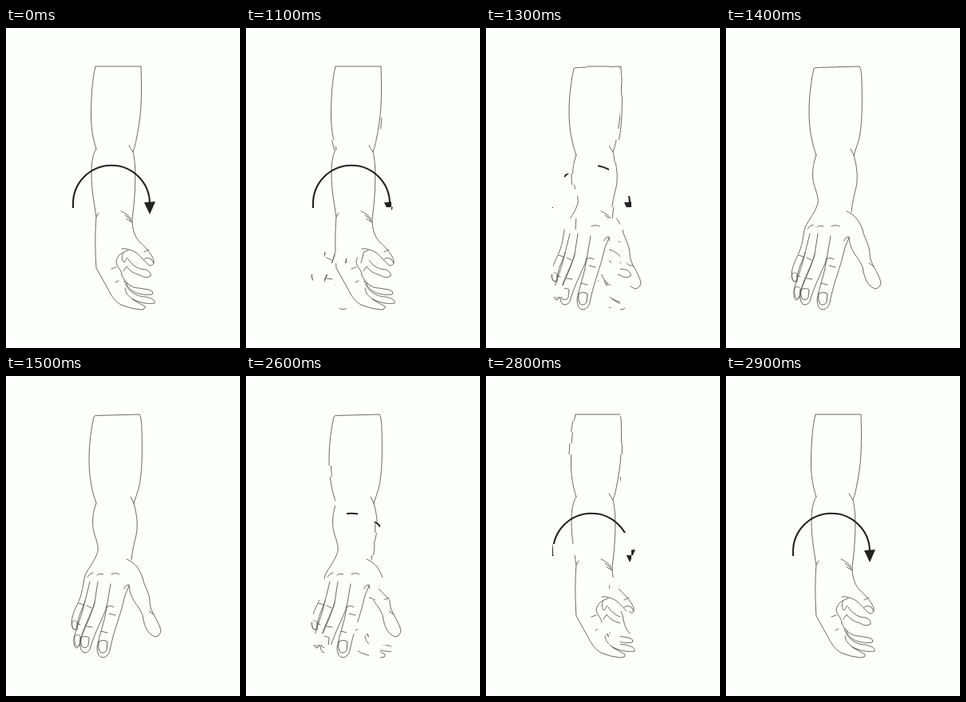
Recreate the animation shown at these times as an HTML page. Size 293 by 400 pixels, loop 3 s.

```html
<!DOCTYPE html>
<html lang="en">
<head>
<meta charset="utf-8">
<title>Forearm rotation</title>
<style>
  html, body { margin: 0; width: 100%; height: 100%; overflow: hidden; background: #fdfffc; }
  svg { display: block; width: 100vw; height: 100vh; }
  .line { fill: none; stroke: #505050; stroke-width: .85; stroke-linecap: round; stroke-linejoin: round; }
  .line * { vector-effect: non-scaling-stroke; }
</style>
</head>
<body>
<svg viewBox="0 0 293 400">
  <defs>
    <clipPath id="palmClip"><path id="palmArea"/></clipPath>
    <clipPath id="backClip"><path id="backArea"/></clipPath>
    <path id="nail" d="M0 1Q5 -2 10 1L9 11Q5 16 1 12Q-1 8 0 1"/>
  </defs>

  <g clip-path="url(#palmClip)">
    <g class="line">
      <!-- arm -->
      <path d="M113 151C109 139 106 124 106.500 105C107 82 108 65 112 48H169C170 78 170 104 165 130C163 140 162 147 159 155L154 147"/>
      <path d="M116 231L113 236C110 217 107 202 107 181C107 167 109 157 113 151"/>
      <path d="M159 155C163 171 162 190 161 210C160 225 158 235 158 242"/>
      <path d="M144 229Q152 232 157 239M149 234Q154 236 158 243M151 239L157 242"/>
      <!-- hand and thumb -->
      <path d="M113 236C111 260 112 285 113 300L127 325C133 337 139 345 147 347L156 350L168 352Q175 352 174 348L158 339"/>
      <path d="M158 242C159 255 162 262 168 268C176 275 183 284 185 290Q186 297 180 297C172 292 166 279 154 277Q149 275 145 276"/>
      <path d="M173 289Q177 286 182 289L185 294M173 280L179 277"/>
      <!-- fingers -->
      <path d="M153 278C145 280 139 285 138 292C139 300 145 302 145 309M147 281C144 286 145 291 148 293L152 287"/>
      <path d="M153 289C159 298 167 302 175 302Q182 305 181 310Q175 314 168 309Q156 306 151 298L147 304"/>
      <path d="M145 309C150 320 158 325 166 325L178 327Q186 329 183 333C170 335 152 330 151 318"/>
      <path d="M148 316C152 329 163 336 175 336Q188 339 186 344C175 346 150 341 149 325M132 301l6 -2M137 318l4 -2"/>
    </g>
    <path d="M84 225V220.500A48 48 0 0 1 180 219" fill="none" stroke="#222" stroke-width="2.100"/>
    <path d="M173 218L187 217L180 233Z" fill="#222"/>
  </g>

  <g clip-path="url(#backClip)" class="line">
    <!-- arm -->
    <path d="M113 159C107 143 104 124 104 105C104 83 107 65 110 51L112 49.500L167 48Q170 52 170 68C171 100 170 126 166 141L160 159L156 151"/>
    <path d="M113 159C109 169 107 183 110 195C113 205 116 212 115 219C112 230 104 239 99 249C96 262 96 271 90 284C86 292 82 300 82 311Q84 318 89 317C89 300 97 290 99 281L105 257"/>
    <path d="M160 159C163 170 166 184 163 199C160 210 158 220 157 230"/>
    <!-- thumb -->
    <path d="M151 229C161 233 167 241 171 252C173 263 180 271 180 282C180 295 190 303 194 318Q193 325 187 326C176 322 174 312 172 305C172 290 155 283 154 262M148 266Q149 261 154 261M179 294l6 4"/>
    <!-- fingers -->
    <path d="M99 281C95 300 88 315 85 328Q84 340 89 340Q92 339 93 331C97 317 106 302 111 283L115 257"/>
    <path d="M111 283C107 298 97 313 93 331Q92 346 99 346Q105 345 106 338C112 319 121 303 126 289L131 260"/>
    <path d="M126 289C124 307 117 322 114 339Q114 351 121 352Q128 351 130 343C134 322 141 305 145 290Q148 274 154 262"/>
    <g>
      <use href="#nail" transform="translate(83 306) scale(.6 .8)"/>
      <use href="#nail" transform="translate(86 324) scale(.7 1)"/>
      <use href="#nail" transform="translate(94 326)"/>
      <use href="#nail" transform="translate(116 331) scale(1.100 1.100)"/>
    </g>
    <!-- knuckles and joints -->
    <path d="M102 251q3 -5 7 -5M114 249q3 -3 8 -1M132 248q5 -3 10 0"/>
    <path d="M91 284l6 2M101 287l6 3M125 289q6 -3 10 0M129 297l8 2M89 309l4 2M101 313l7 1M119 319l8 2"/>
  </g>
</svg>
<script>
const W = 293, H = 400, TILE = 14;
const POSE = 1500;   // one pose: hold, then dissolve
const HOLD = 1000;
const STEP = 100;

const clamp = x => Math.min(1, Math.max(0, x));
const smooth = x => x * x * (3 - 2 * x);

function seeded(seed) {
  return () => {
    seed = (seed * 1664525 + 1013904223) % 4294967296;
    return seed / 4294967296;
  };
}

// Each tile switches at a random moment, the hand a little before the arm.
function makeTiles(seed) {
  const random = seeded(seed);
  const tiles = [];
  for (let y = 0; y < H; y += TILE) {
    for (let x = 0; x < W; x += TILE) {
      const due = 0.85 * random() + 0.15 * (1 - y / H);
      tiles.push({ due, d: `M${x} ${y}h${TILE}v${TILE}h${-TILE}Z` });
    }
  }
  return tiles;
}

const areas = ["palmArea", "backArea"].map(id => document.getElementById(id));
const dissolves = [makeTiles(7), makeTiles(23)];

function fill(area, tiles) {
  area.setAttribute("d", tiles.map(tile => tile.d).join("") || "M0 0Z");
}

const start = performance.now();

function draw(now) {
  const t = Math.max(0, now - start) % (2 * POSE);
  const pose = Math.floor(t / POSE);
  const step = Math.floor((t % POSE - HOLD) / STEP) * STEP;
  const progress = smooth(clamp(1.15 * step / (POSE - HOLD)));
  const tiles = dissolves[pose];
  const switched = tile => progress > 0 && tile.due < progress;

  fill(areas[pose], tiles.filter(tile => !switched(tile)));
  fill(areas[1 - pose], tiles.filter(switched));
  requestAnimationFrame(draw);
}
draw(start);
</script>
</body>
</html>
```
